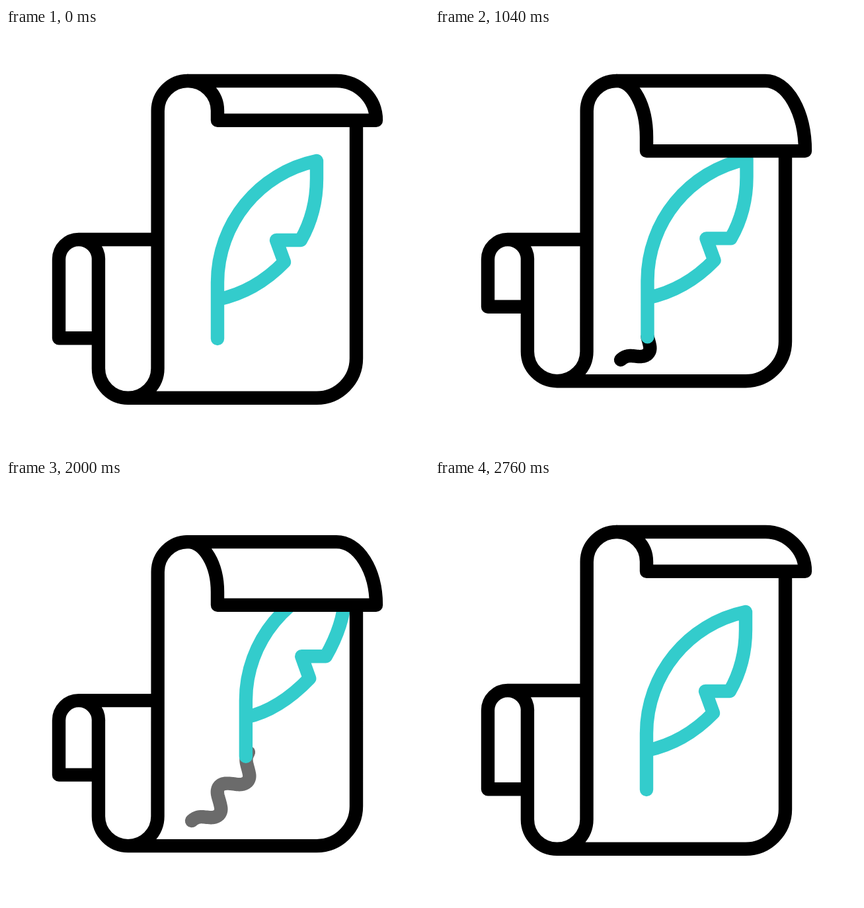
Animation of 640x640 px, one loop 3 s. Source, as an HTML page with a canvas:

```html
<!DOCTYPE html>
<html lang="en">
<head>
<meta charset="utf-8">
<title>Scroll and quill</title>
<style>
  html, body { margin: 0; width: 100%; height: 100%; overflow: hidden; background: #fff; }
  canvas { display: block; width: 640px; height: 640px; }
</style>
</head>
<body>
<canvas id="stage" width="640" height="640"></canvas>
<script>
const ctx = document.getElementById('stage').getContext('2d');
const LOOP = 3000, STEP = 40, LINE = 20.4;
const INK = '#000', TEAL = '#33cccc';

const lerp = (a, b, k) => a + (b - a) * k;
const mix = (p, q, k) => p.map((v, i) => lerp(v, q[i], k));
const linear = (t, from, to) => Math.min(1, Math.max(0, (t - from) / (to - from)));
const ease = (t, from, to) => {
  const u = linear(t, from, to);
  return u * u * (3 - 2 * u);
};
const bump = (t, from, peak, to) => ease(t, from, peak) - ease(t, peak, to);

// Handwriting: a start point followed by cubic segments.
const WRITING_START = [281, 502];
const WRITING = [
  [290, 494, 296, 496, 308, 497],
  [320, 498, 327, 491, 325, 481],
  [323, 470, 319, 463, 320, 456],
  [322, 444, 334, 445, 342, 446],
  [345, 446, 348, 447, 351, 447],
  [363, 448, 370, 441, 368, 431],
  [366, 420, 362, 413, 364, 405],
  [365, 402, 366, 400, 367, 398.5]
];

function flatten(start, segments, steps = 16) {
  const points = [{ x: start[0], y: start[1], at: 0 }];
  let [x0, y0] = start;
  for (const [x1, y1, x2, y2, x3, y3] of segments) {
    for (let i = 1; i <= steps; i++) {
      const u = i / steps, v = 1 - u;
      const cubic = (a, b, c, d) => v * v * v * a + 3 * v * v * u * b + 3 * v * u * u * c + u * u * u * d;
      const x = cubic(x0, x1, x2, x3), y = cubic(y0, y1, y2, y3);
      const last = points[points.length - 1];
      points.push({ x, y, at: last.at + Math.hypot(x - last.x, y - last.y) });
    }
    [x0, y0] = [x3, y3];
  }
  return points;
}

const trail = flatten(WRITING_START, WRITING);
const trailLength = trail[trail.length - 1].at;

function trailPoint(k) {
  const at = k * trailLength;
  const i = Math.max(1, trail.findIndex(p => p.at >= at));
  const a = trail[i - 1], b = trail[i];
  const u = (at - a.at) / (b.at - a.at);
  return [lerp(a.x, b.x, u), lerp(a.y, b.y, u)];
}

// Feather points relative to the nib, upright and bent.
const UPRIGHT = {
  rise: [0, -174, 63, -251, 150, -269],
  edge: [150, -242],
  fall: [150, -208, 142, -177, 126, -149],
  notch: [89, -149],
  barb: [101, -116],
  base: [72, -86, 38, -67, 0, -59]
};
const BENT = {
  rise: [0, -174, 66, -252, 156.5, -271],
  edge: [150, -240],
  fall: [144, -215, 123, -187, 107, -159],
  notch: [71, -159],
  barb: [83, -124.5],
  base: [58, -98, 35, -68, 0, -60]
};

function drawWriting(k, alpha) {
  if (k <= 0 || alpha <= 0) return;
  ctx.globalAlpha = alpha;
  ctx.strokeStyle = INK;
  ctx.beginPath();
  ctx.moveTo(...WRITING_START);
  for (const p of trail) if (p.at < k * trailLength) ctx.lineTo(p.x, p.y);
  ctx.lineTo(...trailPoint(k));
  ctx.stroke();
  ctx.globalAlpha = 1;
}

function drawFeather(nib, degrees, bend) {
  const part = name => mix(UPRIGHT[name], BENT[name], bend);
  ctx.save();
  ctx.translate(...nib);
  ctx.rotate(degrees * Math.PI / 180);
  ctx.strokeStyle = TEAL;
  ctx.beginPath();
  ctx.moveTo(0, 0);
  ctx.lineTo(0, -85);
  ctx.bezierCurveTo(...part('rise'));
  ctx.lineTo(...part('edge'));
  ctx.bezierCurveTo(...part('fall'));
  ctx.lineTo(...part('notch'));
  ctx.lineTo(...part('barb'));
  ctx.bezierCurveTo(...part('base'));
  ctx.stroke();
  ctx.restore();
}

function drawScroll(unroll) {
  const flap = 139.8 + 46.3 * unroll;
  const curl = 125 + 40 * unroll;
  const bottom = 559.8 - 25.6 * unroll;
  const tail = 469.3 - 47.5 * unroll;
  const { PI } = Math;
  ctx.strokeStyle = INK;
  ctx.fillStyle = '#fff';

  // Sheet with its lower curl
  ctx.beginPath();
  ctx.moveTo(530, flap);
  ctx.lineTo(530, bottom - 60);
  ctx.arc(470, bottom - 60, 60, 0, PI / 2);
  ctx.lineTo(184.7, bottom);
  ctx.moveTo(275, 80);
  ctx.arc(275, 125.3, 45.3, -PI / 2, -PI, true);
  ctx.lineTo(229.5, bottom - 44.8);
  ctx.arc(184.7, bottom - 44.8, 44.8, 0, PI);
  ctx.lineTo(139.9, 350);
  ctx.arc(110, 350, 30, 0, -PI, true);
  ctx.lineTo(80, tail);
  ctx.lineTo(139.9, tail);
  ctx.moveTo(110, 320);
  ctx.lineTo(229.5, 320);
  ctx.stroke();

  // Folded top
  ctx.beginPath();
  ctx.moveTo(275, 80);
  ctx.lineTo(500, 80);
  ctx.ellipse(500, flap, 60, flap - 80, 0, -PI / 2, 0);
  ctx.lineTo(320, flap);
  ctx.lineTo(320, curl);
  ctx.ellipse(275, curl, 45, curl - 80, 0, 0, -PI / 2, true);
  ctx.closePath();
  ctx.fill();
  ctx.stroke();
}

function nibAt(t, written) {
  const rest = [320, 470];
  if (t < 667) return mix(rest, WRITING_START, ease(t, 167, 667));
  return mix(trailPoint(written), rest, ease(t, 1833, 2750));
}

function draw(t) {
  const unroll = ease(t, 167, 667) - ease(t, 1667, 2750);
  const drop = 27 * (bump(t, 167, 400, 667) + bump(t, 1667, 2283, 2750));
  const bend = bump(t, 167, 400, 667) + bump(t, 1833, 2333, 2750);
  const tilt = -8.7 * bump(t, 167, 400, 667);
  const written = linear(t, 667, 1620);

  ctx.fillStyle = '#fff';
  ctx.fillRect(0, 0, 640, 640);
  ctx.save();
  ctx.translate(0, drop);
  ctx.lineWidth = LINE;
  ctx.lineCap = ctx.lineJoin = 'round';
  drawWriting(written, 1 - ease(t, 1833, 2208));
  drawFeather(nibAt(t, written), tilt, bend);
  drawScroll(unroll);
  ctx.restore();
}

function tick() {
  const t = performance.now() % LOOP;
  draw(Math.floor(t / STEP) * STEP);
  requestAnimationFrame(tick);
}
tick();
</script>
</body>
</html>
```
